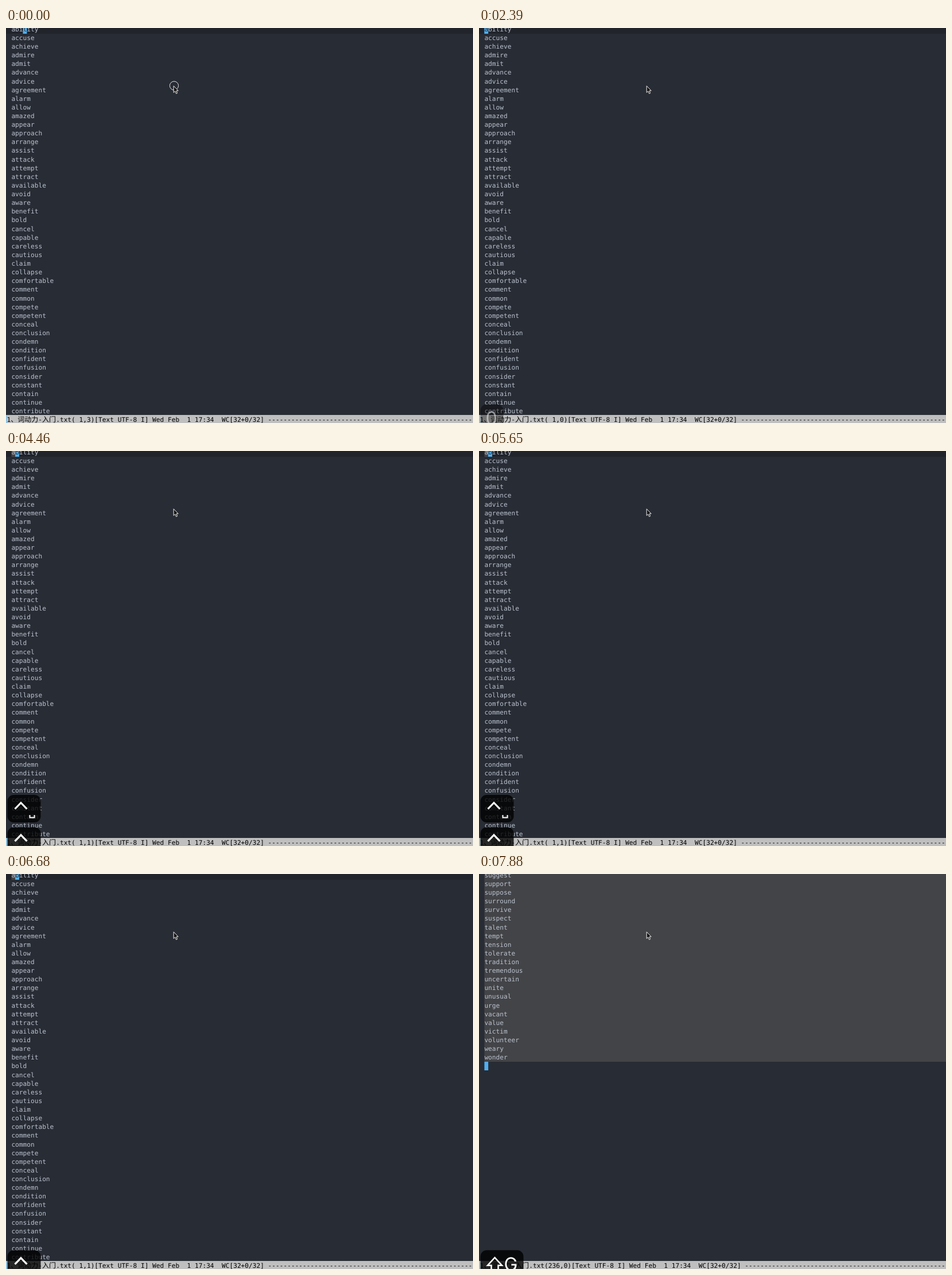
These frames come from a looping animation (814x688 px, 8 s). An HTML page with a canvas:

```html
<!DOCTYPE html>
<html lang="en">
<head>
<meta charset="utf-8">
<title>Word list editor</title>
<style>
html, body { margin: 0; width: 100%; height: 100%; overflow: hidden; background: #282c34; }
canvas { display: block; }
</style>
</head>
<body>
<canvas id="stage" width="814" height="688"></canvas>
<script>
const ctx = document.getElementById('stage').getContext('2d');
const W = 814, H = 688, LOOP = 8000;
const LEFT = 9.4, TOP = -5.6, CELL = 6.72, ROW = 15.12, BASELINE = 11.4, BAR_TOP = 674;
const MONO = '11.16px "DejaVu Sans Mono", monospace';
const CJK = '12px "Noto Sans CJK SC", "Noto Sans CJK", sans-serif';
const COLOR = { bg: '#282c34', line: '#21242b', text: '#bbc2cf', cursor: '#51afef', region: '#434447', bar: '#bfbfbf' };

const firstPage = `ability accuse achieve admire admit advance advice agreement alarm allow amazed
 appear approach arrange assist attack attempt attract available avoid aware benefit bold cancel
 capable careless cautious claim collapse comfortable comment common compete competent conceal
 conclusion condemn condition confident confusion consider constant contain continue contribute`.split(/\s+/);
const lastPage = `suggest support suppose surround survive suspect talent tempt tension tolerate tradition
 tremendous uncertain unite unusual urge vacant value victim volunteer weary wonder`.split(/\s+/);

const JUMP = 6830;
const cursorToggles = [900, 1350, 1950, 2390, 3280, 3720, 4170, 4460, 4900, 5500, 6240, 6680, 7280, 7880];
const keys = [
  { label: '0', width: 40, down: 450, fade: 2390, gone: 2540 },
  { label: 'space', width: 58, down: 2680, fade: 4750, gone: 4900 },
  { label: 'space', width: 58, down: 4320, fade: 6390, gone: 6540 },
  { label: 'space', width: 58, down: 5650, fade: 7580, gone: 7730 },
  { label: 'G', width: 75, down: JUMP, fade: LOOP, gone: LOOP }
];

function rect(x, y, w, h, color) {
  ctx.fillStyle = color;
  ctx.fillRect(x, y, w, h);
}

function text(value, x, y, color, font = MONO) {
  ctx.font = font;
  ctx.fillStyle = color;
  ctx.fillText(value, x, y);
}

function polyline(points, color, width, closed, fill) {
  ctx.beginPath();
  points.forEach(([x, y]) => ctx.lineTo(x, y));
  if (closed) ctx.closePath();
  if (fill) { ctx.fillStyle = fill; ctx.fill(); }
  ctx.strokeStyle = color;
  ctx.lineWidth = width;
  ctx.stroke();
}

const rowTop = row => Math.round(TOP + row * ROW);
const columnX = column => LEFT + column * CELL;

function cell(row, column, color) {
  rect(columnX(column), rowTop(row), CELL, rowTop(row + 1) - rowTop(row), color);
}

function drawBuffer(t) {
  const atEnd = t >= JUMP;
  const words = atEnd ? lastPage : firstPage;
  const column = t < 450 ? 3 : t >= 4460 && !atEnd ? 1 : 0;
  const cursorRow = atEnd ? lastPage.length : 0;
  const cursorOn = cursorToggles.filter(time => t >= time).length % 2 === 0;

  if (atEnd) {
    rect(LEFT, 0, W, rowTop(cursorRow), COLOR.region);
  } else {
    rect(0, 0, W, rowTop(1), COLOR.line);
    if (t >= 2680) for (let i = 0; i <= column; i++) cell(0, i, COLOR.region);
  }
  if (cursorOn) cell(cursorRow, column, COLOR.cursor);

  words.forEach((word, row) => text(word, LEFT, TOP + row * ROW + BASELINE, COLOR.text));
  if (cursorOn && !atEnd) {
    ctx.save();
    ctx.beginPath();
    ctx.rect(columnX(column), 0, CELL, rowTop(1));
    ctx.clip();
    cell(0, column, COLOR.cursor);
    text(words[0], LEFT, TOP + BASELINE, COLOR.bg);
    ctx.restore();
  }
  drawStatus(atEnd ? '236,0' : ' 1,' + column);
}

function drawStatus(position) {
  const baseline = 686.2, ink = '#000';
  rect(0, BAR_TOP, W, H - BAR_TOP, COLOR.bar);
  rect(0, BAR_TOP, 2, H - BAR_TOP, '#8ec0e0');
  text('1', 1.6, baseline, ink);
  text('、词动力', 8.3, baseline, ink, CJK);
  text('-', 56.3, baseline, ink);
  text('入门', 63, baseline, ink, CJK);
  text(`.txt(${position})[Text UTF-8 I] Wed Feb  1 17:34  WC[32+0/32] ` + '-'.repeat(60), 87.2, baseline, ink);
}

function drawKey({ label, width }, y, alpha) {
  const white = '#fff', glyphFont = '32px Inter, sans-serif';
  ctx.save();
  ctx.globalAlpha = alpha;
  ctx.translate(2, y);
  ctx.beginPath();
  ctx.roundRect(0.5, 0, width, 48, 11);
  ctx.fillStyle = 'rgba(0,0,0,.8)';
  ctx.fill();
  if (label === 'space') {
    polyline([[13.5, 24.5], [24, 13.7], [34.5, 24.5]], white, 3.2);
    polyline([[39.5, 35], [39.5, 39.5], [47.5, 39.5], [47.5, 35]], white, 2);
  } else if (label === 'G') {
    polyline([[25.5, 13], [38, 26.5], [31.5, 26.5], [31.5, 37], [19.5, 37], [19.5, 26.5], [13, 26.5]], white, 2.5, true);
    text('G', 41.5, 35.5, white, glyphFont);
  } else {
    ctx.textAlign = 'center';
    text(label, width / 2 - 0.5, 35.5, white, glyphFont);
  }
  ctx.restore();
}

// The newest key sits at the bottom; each later press lifts the older ones.
function drawKeys(t) {
  keys.filter(key => t >= key.down && t < key.gone)
    .reverse()
    .forEach((key, level) => drawKey(key, 655.2 - 56.2 * level, t >= key.fade ? 0.5 : 1));
}

function drawPointer(t) {
  if (t < 150) {
    ctx.beginPath();
    ctx.arc(293, 100.5, 7.6, 0, Math.PI * 2);
    ctx.strokeStyle = '#e4e4e4';
    ctx.lineWidth = 1;
    ctx.stroke();
  }
  polyline([[292.2, 100.8], [292.2, 112.4], [294.8, 110], [296.6, 114.3], [298.6, 113.4],
    [296.8, 109.3], [300.2, 109.2]], '#f4f4f4', 1, true, '#111');
}

function render(now) {
  const t = now % LOOP;
  ctx.textRendering = 'geometricPrecision';
  rect(0, 0, W, H, COLOR.bg);
  drawBuffer(t);
  drawPointer(t);
  drawKeys(t);
}

const start = performance.now();
function tick() {
  render(performance.now() - start);
  requestAnimationFrame(tick);
}
tick();
</script>
</body>
</html>
```
